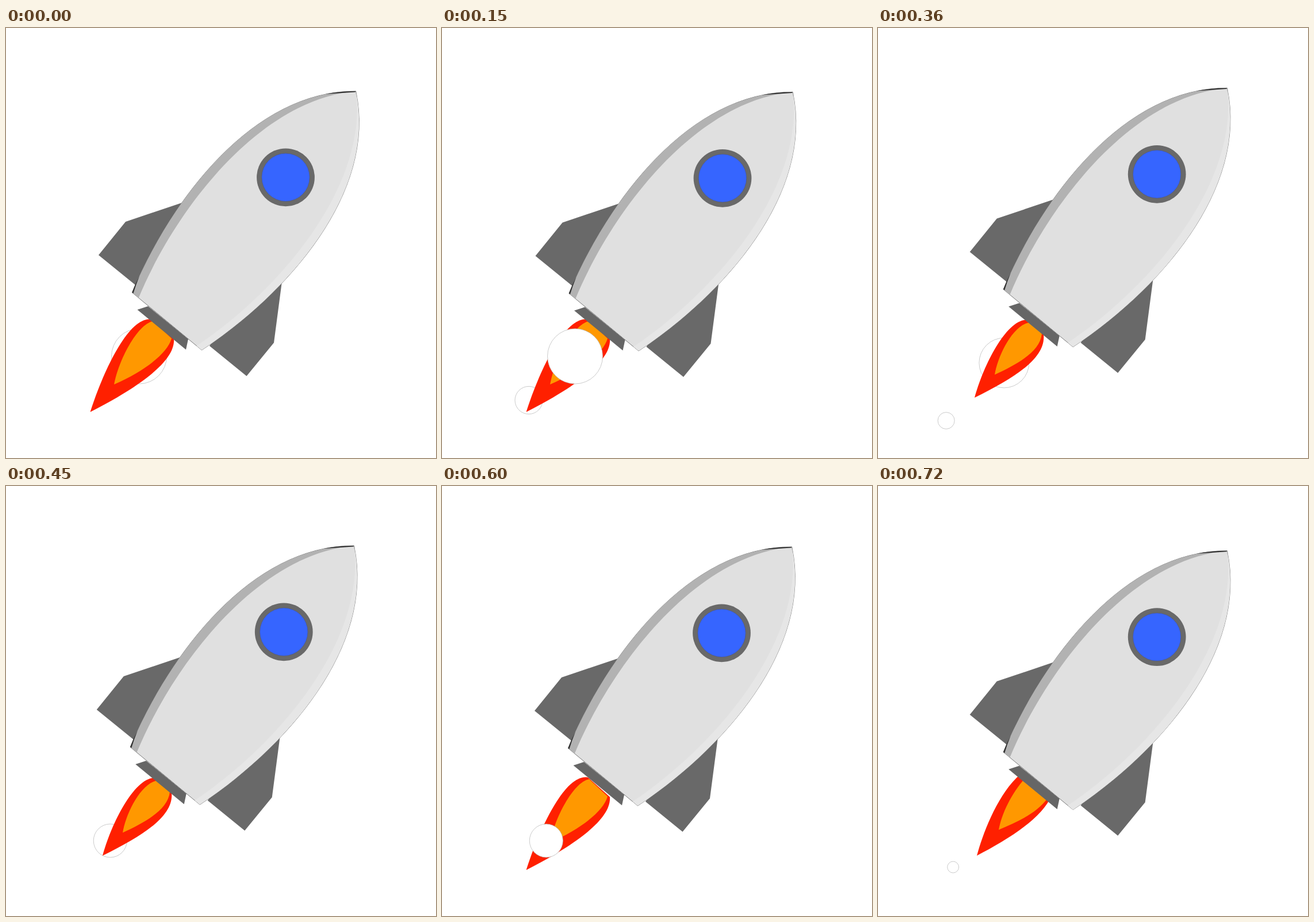
An HTML page for the animation above (750 ms loop, 748 px wide and 748 px high).

```html
<!DOCTYPE html>
<html lang="en">
<head>
<meta charset="utf-8">
<title>Rocket</title>
<style>
  html, body { margin: 0; width: 100%; height: 100%; overflow: hidden; background: #fff; }
  svg { display: block; width: 100vw; height: 100vh; }
  .puff { fill: #fff; stroke: #b4b4b4; stroke-width: .7; }
</style>
</head>
<body>
<svg viewBox="0 0 748 748">
  <g id="back"></g>
  <path id="outer" fill="#ff2000"/>
  <path id="inner" fill="#ff9800"/>
  <g id="front"></g>
  <g id="rocket">
    <path fill="#696969" d="M309 303L208 337L161 395L225 447L300 450ZM480 441L466 547.5L418.5 605.5L354 553L400 480Z"/>
    <path fill="#666" d="M228.5 490L247 484L317 541L313 559.5Z"/>
    <!-- Hull in upright coordinates, base centred on the origin -->
    <g transform="translate(280 510.3) rotate(39.6)">
      <path fill="#e0e0e0" stroke="#777" stroke-width=".9" d="M-78.5 0C-130 -170 -140 -405 -2 -518C140 -405 130 -170 78.5 0Z"/>
      <path fill="#b2b2b2" d="M-78.5 0C-130 -170 -140 -405 -2 -518C-118 -405 -116 -170 -64 0Z"/>
      <path fill="#e6e6e6" d="M78.5 0C130 -170 140 -405 -2 -518C119 -405 117 -170 67 0Z"/>
      <path fill="#333" d="M-2 -518Q-23 -501 -40 -480Q-21 -498 -2 -516ZM-79 0Q-84 -14 -87 -30Q-82 -14 -76 0Z"/>
    </g>
    <circle cx="486.5" cy="259.8" r="50.4" fill="#696969"/>
    <circle cx="486.5" cy="259.8" r="41.7" fill="#3665ff" stroke="#4a5580" stroke-width=".6"/>
  </g>
</svg>
<script>
const STEP = 30, STEPS = 25, FLAME_STEPS = 6;
const $ = id => document.getElementById(id);

const flames = [
  { outer: 'M146.5 668C167 603 213 499 254 507L292 541C295 580 230 625 146.5 668Z',
    inner: 'M188 620C195 580 228 515 256 510L288 540C281 565 243 596 188 620Z' },
  { outer: 'M172 643C182 605 210 530 252 498L302 538C285 580 220 618 172 643Z',
    inner: 'M210 598C215 570 232 535 256 508L296 542C275 570 245 583 210 598Z' },
  { outer: 'M168 643C182 590 225 500 264 508L288 533C293 575 235 610 168 643Z',
    inner: 'M203 603C208 570 237 511 268 512L285 532C282 563 241 586 203 603Z' }
];

// Smoke puffs drift away in a straight line while shrinking.
const big = { x: 231.5, y: 571, r: 48 };
const small = { x: 219.3, y: 582.5, r: 43.4 };
const puffs = [
  { ...big, layer: 'back', start: 0, end: 8, dx: -16.1, dy: 15.3 },
  { ...big, layer: 'front', start: 5, end: 13, dx: -16.13, dy: 16 },
  { ...small, layer: 'back', start: 12, end: 19, dx: -12.67, dy: 11.5 },
  { ...small, layer: 'front', start: 17, end: 24, dx: -12.67, dy: 11.5 }
];
for (const p of puffs) {
  p.el = document.createElementNS('http://www.w3.org/2000/svg', 'circle');
  p.el.setAttribute('class', 'puff');
  $(p.layer).append(p.el);
}

// Rocket shake: step, x, y
const shake = [
  [0, 0, 0], [5, 1.5, 1.5], [8, 4, 2], [9, 3, 1.5], [12, -1.3, -5.5],
  [13, -2.5, -8], [17, -4, -4], [20, 0, -4], [22, 3, -1], [24, -1.3, 2.8]
];
function shakeAt(step) {
  const i = Math.max(1, shake.findIndex(k => k[0] >= step));
  const [a, ax, ay] = shake[i - 1], [b, bx, by] = shake[i];
  const u = (step - a) / (b - a);
  return [ax + (bx - ax) * u, ay + (by - ay) * u];
}

function draw(now) {
  const step = Math.floor(now / STEP) % STEPS;
  const flame = flames[Math.floor(step / FLAME_STEPS) % flames.length];
  $('outer').setAttribute('d', flame.outer);
  $('inner').setAttribute('d', flame.inner);
  $('rocket').setAttribute('transform', `translate(${shakeAt(step)})`);
  for (const p of puffs) {
    const age = step - p.start;
    const visible = age >= 0 && step <= p.end;
    p.el.setAttribute('cx', p.x + p.dx * age);
    p.el.setAttribute('cy', p.y + p.dy * age);
    p.el.setAttribute('r', visible ? p.r - 4.78 * age : 0);
  }
}

function loop() {
  draw(performance.now());
  requestAnimationFrame(loop);
}
loop();
</script>
</body>
</html>
```
